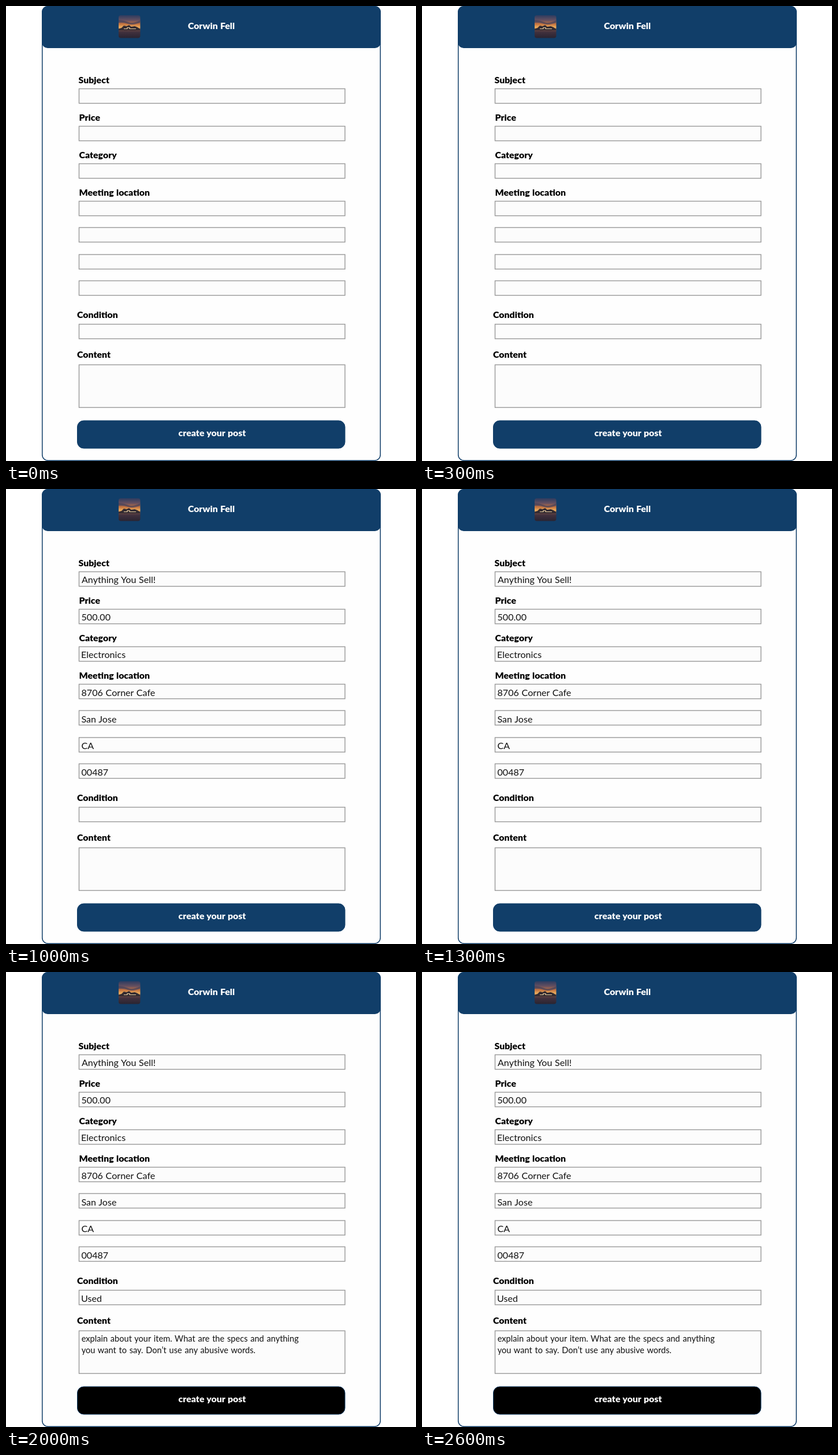
An HTML page that plays this animation: 710 by 789 pixels, repeating every 3000 ms.

```html
<!DOCTYPE html>
<html lang="en">
<head>
<meta charset="utf-8">
<title>Create a post</title>
<style>
  html, body { margin: 0; width: 100%; height: 100%; overflow: hidden; background: #fff; }
  svg { display: block; width: 100vw; height: 100vh; }
  text { font: 400 16.1px Lato, "Open Sans", sans-serif; fill: #111; word-spacing: .6px; }
  .label text, .title { font-weight: 900; font-size: 15.9px; fill: #000; }
  .title { fill: #fff; text-anchor: middle; }
  .note text { font-size: 14.6px; word-spacing: 1px; }
  .fields rect { fill: #fcfcfc; stroke: #999; stroke-width: 1.4; }
  .navy { fill: #113e69; }
  .step { animation: 3s step-end infinite; }
  .one { animation-name: one; }
  .two { animation-name: two; }
  .three { animation-name: three; }
  .button { stroke: #113e69; animation-name: press; }
  @keyframes one { 0% { opacity: 0; } 16.6667%, 100% { opacity: 1; } }
  @keyframes two { 0% { opacity: 0; } 33.3333%, 100% { opacity: 1; } }
  @keyframes three { 0% { opacity: 0; } 50%, 100% { opacity: 1; } }
  @keyframes press { 0% { fill: #113e69; } 66.6667%, 100% { fill: #000; } }
</style>
</head>
<body>
<svg viewBox="0 0 710 789">
  <defs>
    <linearGradient id="dusk" x2="0" y2="1">
      <stop offset="0" stop-color="#2d3c60"/>
      <stop offset=".22" stop-color="#665060"/>
      <stop offset=".38" stop-color="#c2713f"/>
      <stop offset=".54" stop-color="#eeb05e"/>
      <stop offset=".62" stop-color="#6a4843"/>
      <stop offset=".75" stop-color="#40303d"/>
      <stop offset="1" stop-color="#2a2431"/>
    </linearGradient>
  </defs>

  <rect x="62.75" y=".75" width="585.5" height="787.5" rx="10" fill="#fefefe" stroke="#113e69" stroke-width="1.5"/>
  <rect class="navy" x="62" width="587" height="73" rx="10"/>

  <rect x="195" y="16" width="37.5" height="39.5" rx="4" fill="url(#dusk)"/>
  <path d="M195 24q10 1 17 4t20-3v4q-13 5-21 2t-16-2z" fill="#44415c" opacity=".7"/>
  <path d="M195 40l5-2 4-4 5 1 4-2 4 3 6-1 5 2 4 3v2h-37z" fill="#332b31"/>
  <path d="M204 39.5h6v-2h4v2h11" fill="none" stroke="#e8cda0" stroke-width="1.2"/>
  <text class="title" x="355.5" y="40">Corwin Fell</text>

  <g class="fields">
    <rect x="126.5" y="143.5" width="460.5" height="25.2"/>
    <rect x="126.5" y="208.5" width="460.5" height="25.2"/>
    <rect x="126.5" y="273.5" width="460.5" height="25.2"/>
    <rect x="126.5" y="338.5" width="460.5" height="25.2"/>
    <rect x="126.5" y="384.2" width="460.5" height="25.2"/>
    <rect x="126.5" y="431" width="460.5" height="25.2"/>
    <rect x="126.5" y="476.5" width="460.5" height="25.2"/>
    <rect x="126.5" y="551.8" width="460.5" height="25.2"/>
    <rect x="126.5" y="622.2" width="460.5" height="74"/>
  </g>

  <g class="label">
    <text x="125.5" y="133.5">Subject</text>
    <text x="126.5" y="198.5">Price</text>
    <text x="126.5" y="263.5">Category</text>
    <text x="126.5" y="328.5">Meeting location</text>
    <text x="123" y="540.5">Condition</text>
    <text x="123" y="610">Content</text>
  </g>

  <g class="step one">
    <text x="131" y="162.7">Anything You Sell!</text>
    <text x="130.5" y="228.3">500.00</text>
    <text x="130" y="293.3">Electronics</text>
  </g>

  <g class="step two">
    <text x="130.5" y="359">8706 Corner Cafe</text>
    <text x="130.5" y="404.5">San Jose</text>
    <text x="130.5" y="451">CA</text>
    <text x="130.5" y="496.5">00487</text>
  </g>

  <g class="step three">
    <text x="130" y="572">Used</text>
    <g class="note">
      <text x="130.7" y="641.3">explain about your item. What are the specs and anything</text>
      <text x="130.7" y="661.3">you want to say. Don’t use any abusive words.</text>
    </g>
  </g>

  <rect class="step button" x="123.5" y="719" width="463.5" height="48" rx="11"/>
  <text class="title" x="357" y="745.7">create your post</text>
</svg>
</body>
</html>
```
